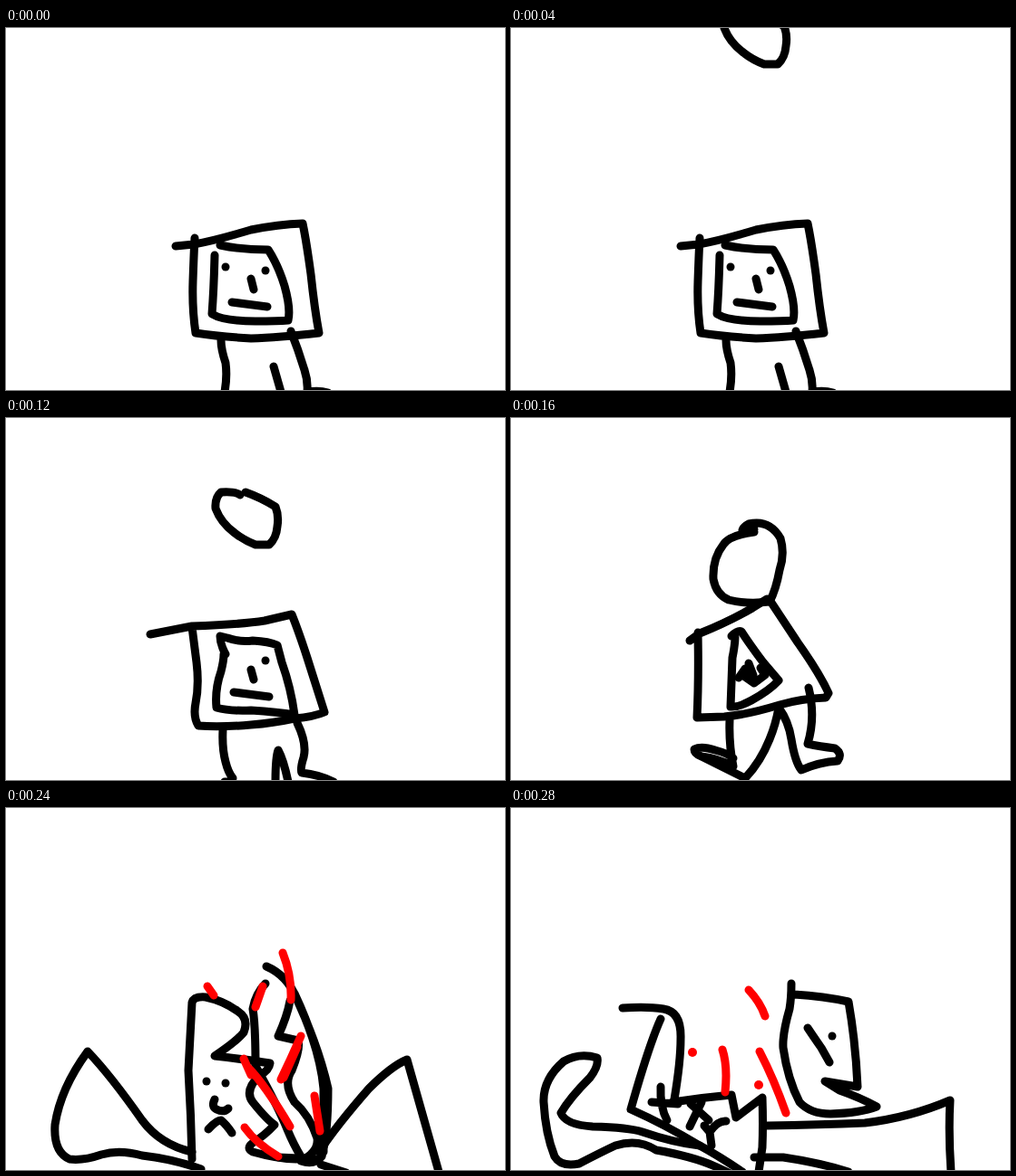
Recreate the animation shown at these times as an HTML page without scripts. Size 550 by 400 pixels, loop 560 ms.

```html
<!DOCTYPE html>
<html lang="en">
<head>
<meta charset="utf-8">
<title>Falling rock doodle</title>
<style>
  html, body { margin: 0; width: 100%; height: 100%; overflow: hidden; background: #fff; }
  svg { display: block; width: 100%; height: 100%; }
  path { fill: none; stroke: #000; stroke-width: 9; stroke-linecap: round; stroke-linejoin: round; }
  .red { stroke: #f00; }
  .dot { fill: #f00; }

  /* Each pose holds for one 40 ms step; the last one holds for half the loop. */
  .pose { visibility: hidden; animation: step 560ms step-end calc(var(--n) * 40ms - 560ms) infinite; }
  .last { animation-name: hold; }
  @keyframes step { 0% { visibility: visible; } 7.142857%, 100% { visibility: hidden; } }
  @keyframes hold { 0% { visibility: visible; } 50%, 100% { visibility: hidden; } }
</style>
</head>
<body>
<svg viewBox="0 0 550 400">
  <defs>
    <path id="rock" d="M262 35Q257 31 241 32Q234 38 235 50Q241 66 256 77Q266 85 279 90L294 90Q302 83 303 70Q305 58 301 48Q285 38 268 32"/>

    <g id="calm">
      <path d="M187 241L207 239Q230 235 270 223Q300 217 327 216Q331 235 336 272Q340 310 345 337Q300 342 270 343Q235 341 209 337Q205 310 206 280Q207 250 208 232"/>
      <path d="M230 251Q229 290 227 316Q240 324 275 324Q300 324 311 323Q314 310 307 285Q300 262 289 245Q260 245 236 240"/>
      <circle cx="242" cy="264" r="4.5"/>
      <circle cx="286" cy="268" r="4.5"/>
      <path d="M270 277L273 289M249 303L288 308"/>
      <path d="M237 345Q237 355 242 370Q244 385 241 402M314 335Q322 355 329 378Q333 390 332 402M295 374L303 402M333 402Q345 400 355 403"/>
    </g>

    <g id="tense">
      <path d="M159 239L205 230Q260 228 285 224L315 217Q323 237 332 265Q343 300 351 325Q340 330 318 332Q295 337 270 339Q235 342 212 340Q206 330 209 315Q213 295 210 270L205 231"/>
      <path d="M242 261Q236 250 236 241L244 243Q258 248 272 246Q290 247 299 251L304 270Q314 298 318 328Q300 325 270 323Q245 324 232 320Q230 300 237 280Q240 268 240 261"/>
      <circle cx="286" cy="268" r="4.5"/>
      <path d="M270 278L273 289M251 303L290 308"/>
      <path d="M239 345Q238 365 242 380Q245 392 250 398M241 402H250M321 337Q332 360 328 375Q324 388 326 392Q345 394 361 402M297 402Q297 375 300 367Q306 378 311 402"/>
    </g>
  </defs>

  <g class="pose" style="--n:0"><use href="#calm"/></g>

  <g class="pose" style="--n:1">
    <use href="#rock" y="-50"/>
    <use href="#calm"/>
  </g>

  <g class="pose" style="--n:2">
    <use href="#rock"/>
    <use href="#tense"/>
  </g>

  <g class="pose" style="--n:3">
    <use href="#rock" x="-4" y="50"/>
    <use href="#tense"/>
  </g>

  <!-- impact -->
  <g class="pose" style="--n:4">
    <path d="M268 126Q240 130 234 140Q222 155 223 178Q226 195 240 201Q260 206 285 203Q292 190 296 168Q302 150 297 133Q285 112 262 117Q256 120 255 124L268 123"/>
    <path d="M197 246L208 238Q240 225 266 210L282 200L287 204L316 248Q340 282 350 304L347 309Q320 310 296 317Q260 328 235 330L205 331Q207 290 206 237"/>
    <path d="M243 241Q250 234 254 236Q263 250 278 270L295 290Q285 301 265 312Q250 320 242 319Q243 290 244 265Q247 250 247 242"/>
    <path d="M251 287L258 277L267 284L262 271M275 276L280 284L268 293L258 286"/>
    <path d="M241 334Q240 360 245 385Q228 376 210 374Q202 371 202 366Q210 362 225 367Q240 371 245 376M208 373Q240 389 258 398Q275 380 285 355Q292 338 295 320Q306 335 309 355Q313 380 320 389Q340 380 360 379Q366 371 357 365Q340 363 327 360Q336 330 328 298"/>
  </g>

  <!-- split -->
  <g class="pose" style="--n:5">
    <path d="M273 120Q255 108 235 108Q222 108 222 120Q222 145 240 180Q255 220 275 222Q300 210 320 180Q330 155 324 135Q312 105 297 90Q288 83 277 96"/>
    <path d="M204 251Q195 262 199 300Q202 340 202 378Q206 386 245 395Q290 400 338 402M204 248L201 235Q208 205 210 195Q225 208 250 222L279 243Q300 225 310 215L328 188Q326 240 328 290Q331 350 338 395M254 393L300 400"/>
    <path d="M63 402Q62 320 58 250Q57 236 66 243Q85 258 95 290Q98 310 97 330Q125 355 160 372Q190 385 215 386M60 402Q100 397 140 397Q180 399 212 404"/>
    <path d="M336 394Q365 355 400 320Q425 290 443 262Q443 290 449 315Q460 355 470 402"/>
    <path d="M243 254Q215 262 210 290Q210 325 240 350Q265 365 288 360Q305 345 301 315Q297 285 285 268Q278 258 266 256"/>
    <path d="M256 240Q258 270 248 297Q243 312 238 309Q229 300 228 284M293 224Q294 270 290 305Q280 292 266 270M243 334Q252 325 257 310Q263 302 270 310L286 348M270 326V310"/>
    <circle class="dot" cx="225" cy="198" r="4.5"/>
    <path class="red" d="M277 229L281 224M311 187L313 228"/>
  </g>

  <!-- collapse -->
  <g class="pose" style="--n:6">
    <path d="M205 388Q204 340 201 290Q203 250 205 215Q207 208 220 209Q240 213 256 225Q268 233 262 248Q255 257 230 274Q265 278 291 282Q290 290 280 295Q262 312 272 325Q288 345 296 350Q285 362 272 370Q264 376 272 380Q300 388 320 388"/>
    <circle cx="221" cy="302" r="4.5"/>
    <circle cx="242" cy="304" r="4.5"/>
    <path d="M230 322Q226 330 232 333Q240 337 245 332M223 355Q232 345 237 345Q243 350 249 359"/>
    <path d="M286 194Q275 205 272 222Q275 240 275 285Q300 330 310 355Q317 372 325 385"/>
    <path d="M287 175Q310 185 320 210Q345 265 355 310Q355 360 348 385Q340 395 325 390Q345 380 343 365Q335 340 318 325Q305 305 315 290Q325 265 322 257L300 252Q310 230 313 213M318 205Q346 265 350 310L350 380M300 386L345 388"/>
    <path d="M205 380Q170 372 150 345Q115 295 90 269Q60 310 54 350Q52 380 70 388Q85 390 105 383Q125 377 150 384Q185 388 215 399M345 380Q365 350 400 310Q425 285 442 278L477 402M347 394L375 403"/>
    <path class="red" d="M222 197L229 207M283 197L275 220M305 160Q315 185 314 212M325 252Q315 275 303 300M321 264L306 298M262 277L270 295M267 287Q285 305 313 352M263 353Q275 370 300 385M340 318L346 357"/>
  </g>

  <!-- aftermath -->
  <g class="pose last" style="--n:7">
    <path d="M309 194Q309 210 307 222Q299 250 300 265Q305 300 318 325Q330 338 352 338Q385 337 403 330Q385 320 362 312L346 302L382 308Q380 260 372 214Q345 208 312 206"/>
    <circle cx="354" cy="252" r="4.5"/>
    <path d="M327 243Q335 255 342 265L351 281"/>
    <path d="M123 221Q150 219 168 222Q188 225 187 255Q187 280 180 322M165 233Q152 262 132 333Q170 350 208 373Q230 385 255 402M178 325Q210 320 243 317L248 342L277 320Q278 350 277 375L273 402"/>
    <path d="M208 373Q180 370 145 358Q130 353 90 352Q60 350 55 337Q65 320 87 298Q97 285 95 276Q75 270 58 280Q35 300 36 325Q38 360 48 385Q55 397 75 393Q100 380 115 373Q140 365 160 378Q200 385 225 396L240 403"/>
    <path d="M282 351Q340 350 390 348Q440 342 484 323Q482 360 485 402M268 386L300 386Q340 392 372 402"/>
    <path d="M165 308Q164 330 172 345M155 325L184 327M198 327L218 345M210 325L197 352M221 373L219 358Q228 345 237 346M219 358L213 351"/>
    <circle class="dot" cx="200" cy="270" r="5"/>
    <circle class="dot" cx="273" cy="306" r="5"/>
    <path class="red" d="M262 201Q275 215 280 230M233 267Q239 285 236 314M274 269Q290 300 303 337"/>
  </g>
</svg>
</body>
</html>
```
